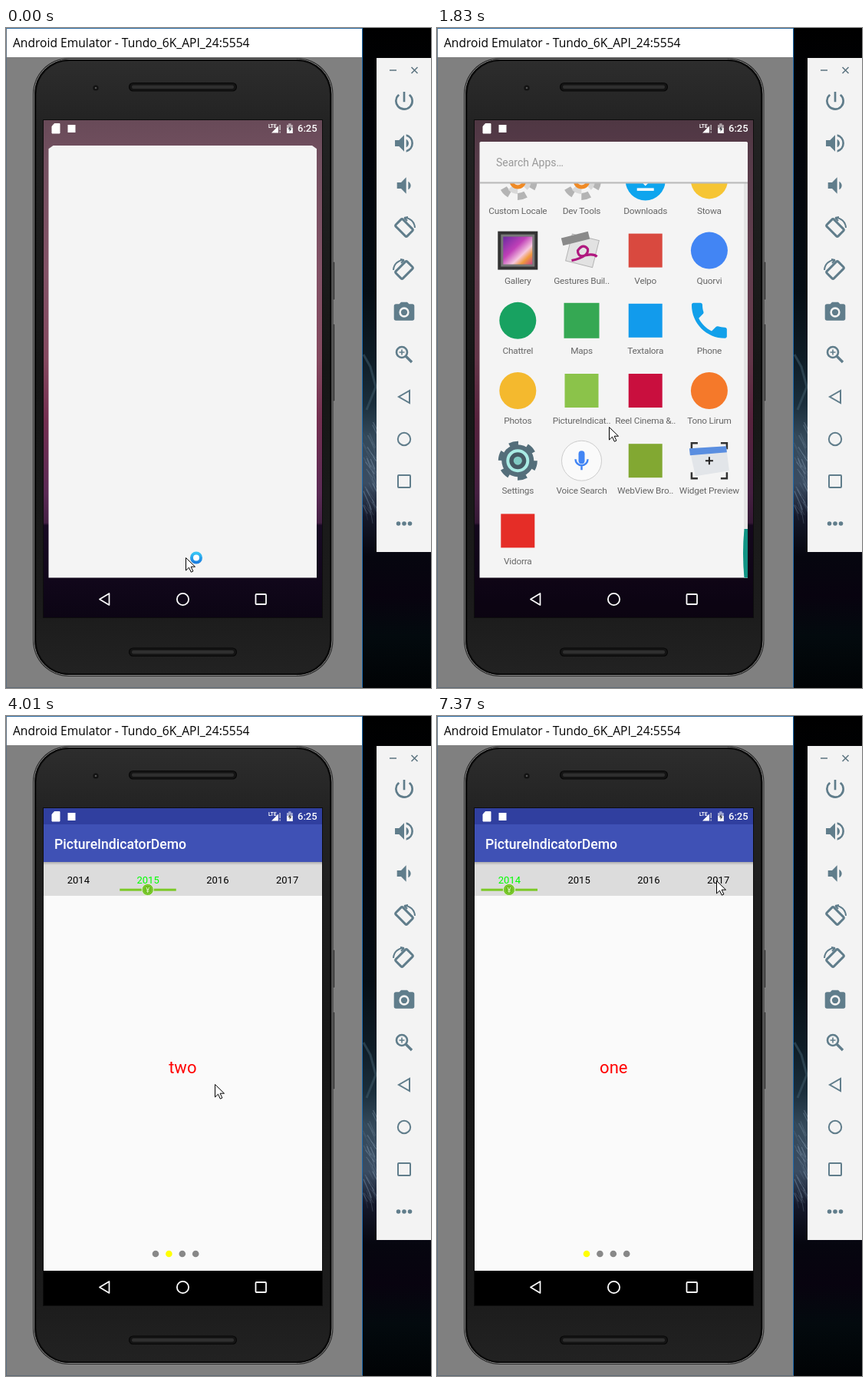
Animation, 554 px wide and 859 px high, one loop 8 s. Source, as an HTML page:

```html
<!DOCTYPE html>
<html lang="en">
<head>
<meta charset="utf-8">
<title>Emulator demo</title>
<style>
html, body { margin: 0; width: 100%; height: 100%; overflow: hidden; background: #000; }
svg { display: block; width: 554px; height: 859px; font-family: Roboto, sans-serif; }
.mid { text-anchor: middle; }
.label { letter-spacing: -.2px; }
</style>
</head>
<body>
<svg id="stage" viewBox="0 0 554 859" xmlns="http://www.w3.org/2000/svg"></svg>
<script>
const LOOP = 8000, PAGE = 363, TAB = PAGE / 4;
const range = n => [...Array(n).keys()];

// ---- drawing helpers ----
const rect = (x, y, w, h, fill, more = '') => `<rect x="${x}" y="${y}" width="${w}" height="${h}" fill="${fill}" ${more}/>`;
const circle = (x, y, r, fill, more = '') => `<circle cx="${x}" cy="${y}" r="${r}" fill="${fill}" ${more}/>`;
const path = (d, fill, more = '') => `<path d="${d}" fill="${fill}" ${more}/>`;
const line = (d, color, w, more = '') => path(d, 'none', `stroke="${color}" stroke-width="${w}" ${more}`);
const text = (x, y, size, fill, s, more = '') => `<text x="${x}" y="${y}" font-size="${size}" fill="${fill}" ${more}>${s}</text>`;
const group = (id, body, more = '') => `<g id="${id}" ${more}>${body}</g>`;
const at = (x, y, body, more = '') => `<g transform="translate(${x} ${y}) ${more}">${body}</g>`;
const gradient = (id, stops, dir = 'x2="0" y2="1"') => `<linearGradient id="${id}" ${dir}>` +
  stops.map(([o, c]) => `<stop offset="${o}" stop-color="${c}"/>`).join('') + '</linearGradient>';
const clip = (id, x, y, w, h) => `<clipPath id="${id}">${rect(x, y, w, h, '#000', `id="${id}Box"`)}</clipPath>`;

const defs = '<defs>' +
  gradient('desk', [[0, '#000'], [.2, '#02040a'], [.4, '#050d14'], [.5, '#0e1c26'], [.57, '#1a2e3c'],
    [.62, '#34495a'], [.69, '#3a4c62'], [.74, '#14182a'], [.8, '#06060f'], [.86, '#08030f'], [.92, '#030a0e'], [1, '#010305']]) +
  gradient('body', [[0, '#2d2d2d'], [.1, '#232323'], [.5, '#161616'], [.9, '#1c1c1c'], [1, '#222']]) +
  gradient('wall', [[0, '#684a58'], [.08, '#735060'], [.3, '#825266'], [.48, '#84495f'], [.6, '#742f50'],
    [.75, '#5b2a55'], [.81, '#452145'], [.815, '#180a24'], [1, '#0c0514']]) +
  gradient('photo', [[0, '#6a2aa0'], [.4, '#c040b8'], [.65, '#f6c8e0'], [.8, '#f09a3c'], [1, '#c8408c']], 'x2="1" y2="1"') +
  gradient('metal', [[0, '#e2e2e2'], [1, '#a4a4a4']]) +
  gradient('shade', [[0, '#000'], [1, '#0000']]) +
  gradient('busyFill', [[0, '#36c4f5'], [1, '#1b7fe0']]) +
  clip('screen', 49, 120, 363, 647) + clip('list', 56, 201, 349, 514.5) +
  clip('launch', 49, 120, 363, 647) + clip('pager', 49, 234, 363, 488) + '</defs>';

// ---- desktop and emulator window ----
let seed = 7;
const rnd = () => (seed = seed * 16807 % 2147483647) / 2147483647;
const streaks = range(40).map(() => {
  const x = 465 + rnd() * 14, y = 510 + rnd() * 120;
  return line(`M${x} ${y}l${4 + rnd() * 8} ${8 + rnd() * 18}`, '#8fa6bc', .5 + rnd(), `opacity="${.1 + rnd() * .3}"`);
}).join('');

const desktop = rect(464, 0, 90, 859, 'url(#desk)') + streaks +
  line('M466 425l9 16 7 26-12 30', '#3b5564', 3, 'opacity=".6"');

const windowFrame = rect(0, 0, 465, 859, '#808080') + rect(0, 0, 465, 38, '#fff') +
  rect(0, 0, 465, 1, '#2f6ea5') + rect(0, 0, 1, 859, '#5f7182') + rect(464, 0, 1, 859, '#1c69ad') + rect(0, 858, 465, 1, '#5f6a75') +
  text(9, 25, 15.6, '#000', 'Android Emulator - Tundo_6K_API_24:5554', 'font-family="Open Sans, Noto Sans, sans-serif"');

const slot = y => rect(160.5, y, 140, 10.5, '#141414', 'rx="5.2" stroke="#080808" stroke-width="1.2"') +
  rect(164, y + 3, 133, 4.5, '#2f2f2f', 'rx="2"');
const sideKey = (y, h) => rect(426, y, 3, h, '#454545', 'rx="1" stroke="#999" stroke-width=".7"');
const phone = sideKey(304, 50) + sideKey(385, 101) +
  rect(35, 39, 391.5, 805, '#2a2a2a', 'rx="47"') +
  rect(36.5, 40.5, 388.5, 802, '#0b0b0b', 'rx="45.5" stroke="#8c8c8c" stroke-width="1"') +
  rect(38.5, 42, 384.5, 799, 'url(#body)', 'rx="44" stroke="#0a0a0a" stroke-width="2"') +
  circle(117, 78, 3.6, '#121212') + circle(117, 78, 1.3, '#555') + slot(71.5) + slot(807) +
  rect(48, 119, 365, 649, '#0d0d0d');

// ---- side toolbar ----
const INK = '#607d8b';
const glyph = (y, d, more = '') => at(519, y, path(d, INK, 'fill-rule="evenodd"') + more, 'scale(1.33) translate(-12 -12)');
const turned = (y, flip) => at(519, y,
  rect(-6.5, -10.5, 13, 21, 'none', `rx="2" stroke="${INK}" stroke-width="3" transform="rotate(-45)"`) +
  line('M0 -13A13.5 13.5 0 0 1 14 0M0 -13l5 -1M0 -13l4 4', INK, 2), `scale(${flip} 1)`);
const toolbar = rect(483, 39, 71, 643, '#f3f3f3') +
  line('M500 55h9M528.5 51l8 8m0 -8l-8 8', '#5c7480', 1.5) +
  glyph(95, 'M13 3h-2v10h2V3zm4.83 2.17l-1.42 1.42A7 7 0 1 1 7.58 6.58L6.17 5.17A9 9 0 1 0 17.83 5.17z') +
  glyph(150, 'M3 9v6h4l5 5V4L7 9H3zm13.5 3c0-1.77-1.02-3.29-2.5-4.03v8.05c1.48-.73 2.5-2.25 2.5-4.02zM14 3.23v2.06a7 7 0 0 1 0 13.42v2.06a9 9 0 0 0 0-17.54z') +
  glyph(205, 'M18.5 12c0-1.77-1.02-3.29-2.5-4.03v8.05c1.48-.73 2.5-2.25 2.5-4.02zM5 9v6h4l5 5V4L9 9H5z') +
  turned(260, 1) + turned(315, -1) +
  glyph(370, 'M9 2L7.17 4H4a2 2 0 0 0-2 2v12a2 2 0 0 0 2 2h16a2 2 0 0 0 2-2V6a2 2 0 0 0-2-2h-3.17L15 2H9zm3 15a5 5 0 1 1 0-10 5 5 0 0 1 0 10z', circle(12, 12, 3.1, INK)) +
  circle(516, 422, 7, 'none', `stroke="${INK}" stroke-width="2.6"`) + line('M521 427l8 8', INK, 3.4) + line('M512.5 422h7m-3.5-3.5v7', INK, 1.6) +
  line('M526 472v16l-14 -8z', INK, 2) + circle(519, 535, 8.2, 'none', `stroke="${INK}" stroke-width="2"`) +
  rect(511, 582, 16, 16, 'none', `rx="1" stroke="${INK}" stroke-width="2"`) +
  [511.5, 519, 526.5].map(x => circle(x, 645, 2.8, INK)).join('');

// ---- status and navigation bars ----
const status = path('M63 124.5h7v12.5h-10v-9z', '#fff', 'stroke="#fff" stroke-linejoin="round"') +
  rect(80.5, 126, 10, 10, '#fff') +
  text(342, 130, 6.5, '#fff', 'LTE', 'font-weight="700"') +
  path('M346 136.5h9v-9z', '#fff') + rect(356.5, 126, 1.2, 7, '#ddd') + rect(356.5, 134.5, 1.2, 2, '#ddd') +
  path('M366 130v-4h2.2v-1.8h3.4v1.8h2.2v4z', '#fff8') + rect(366, 130, 7.8, 7, '#fff') +
  path('M370.6 127.5l-2.8 4.3h1.8v3.3l2.8-4.4h-1.8z', '#41424a') +
  text(380, 135, 13, '#fff', '6:25', 'font-weight="500"');
const nav = line('M134.5 736v15l-12.5 -7.5z', '#fff', 1.7, 'stroke-linejoin="round"') +
  circle(230.5, 743.5, 7.6, 'none', 'stroke="#fff" stroke-width="1.8"') +
  rect(325.5, 737, 13.5, 13, 'none', 'rx="1" stroke="#fff" stroke-width="1.8"');

// ---- app drawer ----
const disc = (c, r = 24) => circle(0, 0, r, c);
const block = (c, s = 44) => rect(-s / 2, -s / 2, s, s, c);
const cog = (r, w, c, n) => circle(0, 0, r, 'none', `stroke="${c}" stroke-width="${w}" stroke-dasharray="${Math.PI * r / n}"`);
const tools = cog(21, 9, '#b4b4b4', 6) + cog(14, 7, '#d8d8d8', 4) +
  circle(0, 0, 8.5, '#f6e6d8', 'stroke="#f08a24" stroke-width="5"');
const folder = path('M-25 -19q0-3 3-3h17l4 5h23q3 0 3 3v33h-50z', '#b0b0b0') + rect(-25, -10, 50, 30, 'url(#metal)', 'rx="2"') +
  at(1, 3, cog(9, 5, '#666', 6) + circle(0, 0, 6.5, 'none', 'stroke="#666" stroke-width="5"'));
const calc = rect(-23, -24, 23, 24, '#90a4ae') + rect(0, -24, 23, 24, '#455a64') + rect(-23, 0, 46, 24, '#546e7a') +
  line('M-16 -13h9M-16 9h9m-4.5-4.5v9M8 -17l7 7m0-7l-7 7', '#fff', 2) + circle(12, 10, 14, '#1de9b6') + line('M7 8h10M7 12.5h10', '#fff', 2);
const calendar = rect(-22, -23, 44, 46, '#4a86f4', 'rx="3"') + rect(-22, -23, 44, 10, '#3a5fbe', 'rx="2"') +
  text(0, 11, 26, '#e9f0ff', '31', 'class="mid"');
const camera = rect(-12, -22, 24, 10, '#777', 'rx="2"') + rect(-26, -18, 52, 37, '#4a4a4a', 'rx="3"') + rect(-26, -13, 52, 8, '#bbb') +
  circle(0, 2, 16, '#222', 'stroke="#888" stroke-width="1.5"') + circle(0, 2, 10, '#4a2370') + circle(-2, 0, 4, '#9b62c8');
const clock = circle(0, 0, 24.5, '#91a2ea', 'stroke="#5566b8" stroke-width="3"') + line('M0 -17V0L13 13', '#fff', 3.5);
const contacts = rect(-23, -22, 46, 45, '#03a9f4', 'rx="3"') + rect(-23, -22, 46, 22, '#0b7cc1', 'rx="3"') +
  circle(0, -6, 6.5, '#fff') + path('M-13 14v-4q3-7 13-7t13 7v4z', '#fff');
const download = disc('#0ea5ee', 26) + path('M-4 -14h8v10h7L0 7-11 -4h7z', '#fff') + rect(-11, 10, 22, 3.5, '#fff');
const gallery = rect(-26, -25, 52, 50, '#333') + rect(-22, -21, 44, 42, '#777') + rect(-19, -18, 38, 36, 'url(#photo)');
const gestures = rect(-17, -18, 36, 36, '#e2e2e2', 'transform="rotate(14)" stroke="#b5b5b5"') + rect(-22, -22, 36, 10, '#8a8a8a', 'transform="rotate(-14)"') +
  line('M-13 13Q10 8 8 -2Q2 -10 -5 0Q-5 10 6 6Q16 4 20 8', '#b0187f', 3.2);
const call = at(0, 0, path('M6.62 10.79c1.44 2.83 3.76 5.14 6.59 6.59l2.2-2.2c.27-.27.67-.36 1.02-.24 1.12.37 2.33.57 3.57.57.55 0 1 .45 1 1V20c0 .55-.45 1-1 1-9.39 0-17-7.61-17-17 0-.55.45-1 1-1h3.5c.55 0 1 .45 1 1 0 1.25.2 2.45.57 3.57.11.35.03.74-.25 1.02z', '#12a0ea'), 'scale(2.55) translate(-12 -12)');
const settings = cog(21, 9, '#546e7a', 6) + disc('#546e7a', 21) + circle(0, 0, 13, '#455a64', 'stroke="#a9ebe4" stroke-width="4"') + circle(0, 0, 5.5, '#80cbc4');
const mic = circle(0, 0, 26, '#fafafa', 'stroke="#ccc"') + rect(-4, -13, 8, 17, '#4285f4', 'rx="4"') + line('M-8 -2a8 8 0 0 0 16 0M0 6v6', '#4285f4', 2.5);
const widget = line('M-23 -15v-8h8M15 -23h8v8M23 15v8h-8M-15 23h-8v-8', '#333', 2.5) +
  path('M-26 -16L22 -19 26 13-18 20z', '#e2e5e9') + path('M-26 -16L22 -19 23 -11-25 -7z', '#5a8ee0') + line('M-5 0H5M0 -5V5', '#222', 2);
const bot = '#8bc34a';

const apps = [
  ['API Demos', folder], ['Calculator', calc], ['Calendar', calendar], ['Camera', camera],
  ['CameraDemo', block(bot)], ['Orvane', disc('#db4a3e', 26)], ['Clock', clock], ['Contacts', contacts],
  ['Custom Locale', tools], ['Dev Tools', tools], ['Downloads', download], ['Stowa', disc('#f6c534')],
  ['Gallery', gallery], ['Gestures Buil..', gestures], ['Velpo', block('#d9493f')], ['Quorvi', disc('#4285f4')],
  ['Chattrel', disc('#18a261')], ['Maps', block('#35a853', 46)], ['Textalora', block('#129bec')], ['Phone', call],
  ['Photos', disc('#f4b92e')], ['PictureIndicat..', group('target', block(bot))], ['Reel Cinema &amp;..', block('#c90f3e')], ['Tono Lirum', disc('#f5792a')],
  ['Settings', settings], ['Voice Search', mic], ['WebView Bro..', block('#82a832')], ['Widget Preview', widget],
  ['Vidorra', block('#e52d27')]
];
const grid = apps.map(([name, icon], i) => at(105.3 + i % 4 * 83.2, 245 + (i >> 2) * 91.2,
  icon + text(0, 43.3, 11.8, '#666', name, 'class="mid label"'))).join('');

const drawer = rect(49, 120, 363, 647, 'url(#wall)') + rect(49, 120, 363, 647, '#080008', 'id="dim"') +
  path('', '#f4f4f4', 'id="card"') +
  group('content', text(77, 180, 14, '#999', 'Search Apps…') +
    `<g clip-path="url(#list)">${group('grid', grid)}${rect(400, 201, 5, 515, '#e4e4e4')}` +
    path('M405 0h-4.5q-3 31 0 64h4.5z', '#109484', 'id="thumb"') + '</g>' +
    rect(56, 200, 349, 1, '#d0d0d0') + rect(56, 201, 349, 1.5, '#bbb', 'id="edge"')) + status + nav;

// ---- demo app ----
const words = ['one', 'two', 'three', 'four'];
const app = rect(49, 120, 363, 647, '#fff') +
  group('screenBody',
    rect(49, 141, 363, 50, '#3f51b5') + text(63, 172.5, 17.6, '#fff', 'PictureIndicatorDemo', 'font-weight="500"') +
    rect(49, 234, 363, 488, '#fafafa') + rect(49, 190, 363, 44, '#dcdcdc') +
    rect(49, 190, 363, 4, 'url(#shade)', 'opacity=".22"') +
    words.map((w, i) => text(49 + TAB * (i + .5), 217.5, 13, '#000', 2014 + i, 'class="mid tab"')).join('') +
    group('mark', rect(57.5, 224.7, 73.5, 3, '#7cc928') + circle(94, 226, 7.6, '#6cbf1d', 'stroke="#e4f2d5" stroke-width="1"') +
      circle(94, 226, 5.6, 'none', 'stroke="#8fd548" stroke-width=".8"') + text(94, 229.6, 9.5, '#e9f7d8', '¥', 'class="mid"')) +
    `<g clip-path="url(#pager)">${group('pages', words.map((w, i) => text(230.3 + i * PAGE, 465, 22, '#f00', w, 'class="mid"')).join(''))}</g>` +
    words.map((w, i) => circle(195 + i * 17.4, 700, 4.3, '#888', 'class="dot"')).join('')) +
  rect(49, 120, 363, 21, '#303f9f') + rect(49, 722, 363, 45, '#000', 'id="navBack"') + status + nav;

const pointer = group('pointer', path('M.5 .5v16.5l4-3.8 2.8 6 2.6-1.2-2.8-5.8h5.4z', '#fff', 'stroke="#000" stroke-width="1"') +
  circle(14, .5, 6, '#fff', 'id="busy" stroke="url(#busyFill)" stroke-width="4"'));

const stage = document.getElementById('stage');
stage.innerHTML = defs + desktop + windowFrame + phone +
  `<g clip-path="url(#screen)">${group('drawer', drawer)}${group('app', app, 'clip-path="url(#launch)"')}</g>` + toolbar + pointer;

// ---- motion ----
const $ = id => document.getElementById(id);
const tabs = document.querySelectorAll('.tab'), dots = document.querySelectorAll('.dot');
const set = (el, o) => { for (const k in o) el.setAttribute(k, o[k]); };
const move = (id, x, y) => set($(id), { transform: `translate(${x} ${y})` });

// Screen refreshes: runs of [start, count], 120 ms apart.
const ticks = [[0, 2], [270, 3], [660, 3], [1050, 2], [1320, 1], [1470, 4], [1980, 2], [2350, 1], [2600, 1], [2750, 2], [3020, 6],
  [3770, 3], [4320, 4], [4830, 1], [4980, 2], [5250, 5], [5980, 4], [6740, 3], [7130, 3]]
  .flatMap(([s, n]) => range(n).map(i => s + i * 120));

// Linear track through [time, ...values] keys.
function track(t, keys) {
  const i = keys.findIndex(k => k[0] > t);
  if (i === 0) return keys[0].slice(1);
  if (i < 0) return keys[keys.length - 1].slice(1);
  const a = keys[i - 1], b = keys[i], p = (t - a[0]) / (b[0] - a[0]);
  return a.slice(1).map((v, j) => v + (b[j + 1] - v) * p);
}

const pointerPath = [[0, 234, 689], [270, 236, 686], [660, 277, 611], [1320, 277, 611], [1830, 224, 519], [2100, 202, 487],
  [3020, 202, 487], [3620, 375, 488], [4010, 272, 479], [4200, 272, 479], [4440, 372, 486], [4680, 296, 483], [4830, 290, 483],
  [5100, 228, 442], [5730, 270, 211], [6100, 270, 211], [6340, 150, 200], [6740, 84, 209], [6980, 84, 209], [7370, 364, 214]];
const pagePath = [[3620, 0], [3770, .25], [3890, .8], [4010, 1], [4200, 1], [4320, 1.08], [4440, 1.38], [4560, 1.8], [4680, 1.97],
  [4830, 2], [4980, 2.33], [5100, 2.75], [5250, 2.96], [5370, 3], [5860, 3], [5980, 2.8], [6100, 2.3], [6220, 2.04], [6340, 2],
  [6740, 2], [6860, .8], [6980, 0]];

function drawDrawer(t) {
  const [top, cut, dim] = track(t, [[0, 153, 6, 0], [510, 148, 1.5, .26]]);
  set($('dim'), { opacity: dim });
  set($('card'), { d: `M${55.5 + cut} ${top}H${405 - cut}L405 ${top + cut * .7}V715.5H55.5V${top + cut * .7}z` });
  set($('content'), { opacity: track(t, [[510, 0], [780, 1]])[0] });
  const [scroll] = track(t, [[780, 0], [900, 25], [1050, 140], [1170, 229]]);
  move('grid', 0, -scroll);
  set($('edge'), { opacity: Math.min(1, scroll / 20) });
  move('thumb', 0, 201 + 451 * track(t, [[780, 0], [900, .1], [1050, .3], [1170, .51], [1320, 1]])[0]);
  set($('target'), { opacity: t >= 2350 && t < 2600 ? .65 : 1 });
}

function drawApp(t) {
  set($('app'), { visibility: t < 2750 ? 'hidden' : 'visible' });
  const [x, y, width, height] = track(t, [[2650, 163, 444, 52, 52], [2870, 49, 121, 363, 646], [3020, 49, 120, 363, 647]]);
  set($('launchBox'), { x, y, width, height });
  set($('screenBody'), { opacity: track(t, [[2790, 0], [2990, 1]])[0] });
  const late = t < 3020 ? 1 : 0;
  move('screenBody', 0, late);
  move('navBack', 0, late);
  const [page] = track(t, pagePath), now = Math.round(page);
  move('mark', page * TAB, 0);
  move('pages', -page * PAGE, 0);
  tabs.forEach((el, i) => set(el, { fill: i === now ? '#0f0' : '#000' }));
  dots.forEach((el, i) => set(el, { fill: i === now ? '#ff0' : '#888' }));
}

function draw(ms) {
  const t = ticks.filter(k => k <= ms).pop();
  drawDrawer(t);
  drawApp(t);
  move('pointer', ...track(t, pointerPath));
  set($('busy'), { visibility: t < 390 ? 'visible' : 'hidden' });
}

const start = performance.now();
function loop() {
  draw(Math.max(0, performance.now() - start) % LOOP);
  requestAnimationFrame(loop);
}
loop();
</script>
</body>
</html>
```
